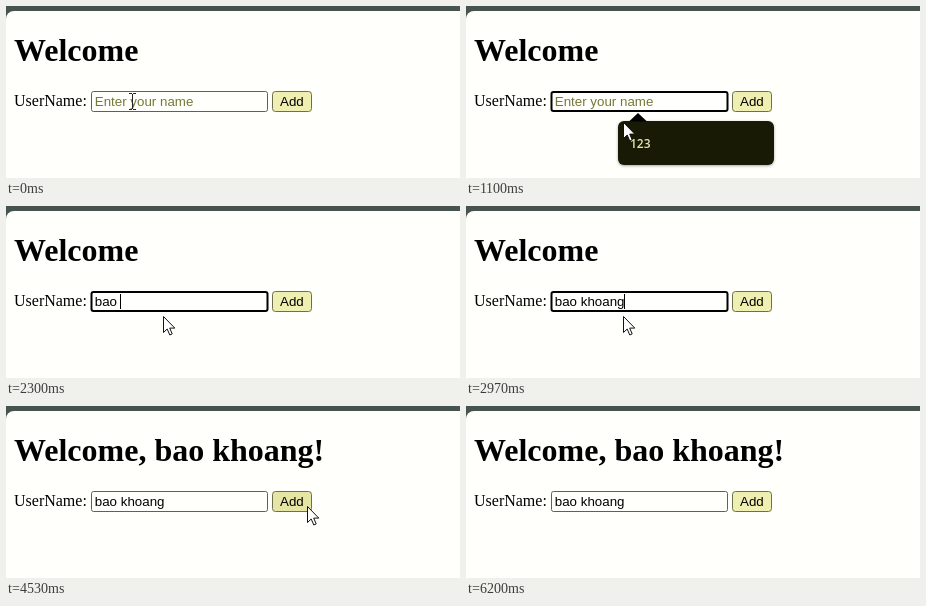
These frames come from a looping animation (454x172 px, 6.31 s). An HTML page with a canvas:

```html
<!DOCTYPE html>
<html lang="en">
<head>
<meta charset="utf-8">
<title>Welcome form</title>
<style>
html, body { margin: 0; width: 100%; height: 100%; overflow: hidden; background: #fffffb; }
canvas { display: block; width: 454px; height: 172px; }
</style>
</head>
<body>
<canvas id="stage"></canvas>
<script>
const W = 454, H = 172, LOOP = 6310;
const SERIF = '"Liberation Serif", "Times New Roman", serif';
const SANS = '"Liberation Sans", Arial, sans-serif';
const NAME = 'bao khoang';

const FOCUS = 110, POPUP = 170, BLUR = 4320, CURSOR_OUT = 5880;
const KEYS = [1480, 1700, 1960, 2160, 2400, 2510, 2620, 2730, 2840, 2950];
const TYPING_DONE = 3030;

// time, x, y of the pointer's hot spot
const PATH = [
  [0, 126, 95], [250, 126, 95], [580, 155, 138], [750, 155, 138],
  [1250, 157, 110], [3860, 157, 110], [4180, 284, 97], [4480, 284, 97],
  [4700, 411, 117], [5060, 298, 44], [5200, 298, 44], [5500, 297, 38]
];

const canvas = document.getElementById('stage');
const ctx = canvas.getContext('2d');
const dpr = window.devicePixelRatio || 1;
canvas.width = Math.round(W * dpr);
canvas.height = Math.round(H * dpr);

function text(str, x, y, font, color) {
  ctx.font = font;
  ctx.fillStyle = color;
  ctx.fillText(str, x, y);
}

function box(x, y, w, h, r, fill, stroke, line = 1) {
  ctx.beginPath();
  ctx.roundRect(x, y, w, h, r);
  if (fill) {
    ctx.fillStyle = fill;
    ctx.fill();
  }
  if (stroke) {
    ctx.strokeStyle = stroke;
    ctx.lineWidth = line;
    ctx.stroke();
  }
}

function pointerAt(t) {
  const i = PATH.findIndex(p => p[0] > t);
  if (i < 0) return PATH[PATH.length - 1].slice(1);
  const [t0, x0, y0] = PATH[i - 1], [t1, x1, y1] = PATH[i];
  const u = (t - t0) / (t1 - t0), e = u * u * (3 - 2 * u);
  return [x0 + (x1 - x0) * e, y0 + (y1 - y0) * e];
}

const inside = (x, y, l, t, r, b) => x >= l && x < r && y >= t && y < b;

function drawInput(t, typed) {
  const focused = t >= FOCUS && t < BLUR;
  if (focused) box(85.5, 86, 176, 19, 2, '#fffffb', '#000', 2);
  else box(85.5, 85.5, 176, 20, 2, '#fffffb', '#62624c');

  const font = '13.333px ' + SANS;
  if (typed) text(typed, 88.8, 100, font, '#000');
  else text('Enter your name', 88.8, 100, font, '#77773a');

  const lastKey = KEYS.filter(k => k <= t).pop() || FOCUS;
  const blinkOn = Math.floor((t - lastKey) / 500) % 2 === 0;
  if (focused && t < TYPING_DONE && blinkOn) {
    ctx.font = font;
    const x = Math.floor(88.8 + ctx.measureText(typed).width);
    ctx.fillStyle = '#000';
    ctx.fillRect(x, 88, 1, 15);
  }
}

function drawButton(hover) {
  box(266.5, 85.5, 39, 20, 3, hover ? '#e5e5a4' : '#f0efb2', '#6e6e50');
  text('Add', 274, 100, '13.333px ' + SANS, '#000');
}

function drawPopup() {
  ctx.save();
  ctx.shadowColor = 'rgba(0,0,0,.35)';
  ctx.shadowBlur = 3 * dpr;
  ctx.shadowOffsetY = dpr;
  box(152, 115, 156, 44, 6, '#191a05');
  ctx.restore();
  ctx.beginPath();
  ctx.moveTo(163, 115.5);
  ctx.lineTo(172, 107);
  ctx.lineTo(181, 115.5);
  ctx.fill();
  text('123', 164, 142, '600 12px "Open Sans", "Noto Sans", sans-serif', '#e6e6b4');
}

function drawArrow(x, y) {
  ctx.save();
  ctx.translate(Math.round(x) + .5, Math.round(y) + .5);
  ctx.beginPath();
  [[0, 0], [0, 16], [3.7, 12.5], [6.3, 18.5], [8.7, 17.4], [6.2, 11.6], [11.3, 11.6]]
    .forEach(p => ctx.lineTo(...p));
  ctx.closePath();
  ctx.fillStyle = '#fff';
  ctx.fill();
  ctx.strokeStyle = '#111';
  ctx.lineWidth = 1;
  ctx.stroke();
  ctx.restore();
}

function drawBeam(x, y) {
  x = Math.round(x);
  y = Math.round(y);
  ctx.fillStyle = '#222';
  ctx.fillRect(x, y - 7, 1, 15);
  for (const edge of [y - 8, y + 8]) {
    ctx.fillRect(x - 3, edge, 3, 1);
    ctx.fillRect(x + 1, edge, 3, 1);
  }
}

function draw(t) {
  const typed = NAME.slice(0, KEYS.filter(k => k <= t).length);
  const greeted = t >= BLUR;
  const [x, y] = pointerAt(t);
  const hover = inside(x, y, 266, 85, 306, 106);

  ctx.setTransform(dpr, 0, 0, dpr, 0, 0);
  ctx.fillStyle = '#46534e';
  ctx.fillRect(0, 0, W, H);
  box(0, 5, W, H, [8, 0, 0, 0], '#fffffb');

  text(greeted ? `Welcome, ${NAME}!` : 'Welcome', 8, 55, 'bold 32px ' + SERIF, '#000');
  text('UserName:', 8, 100, '16px ' + SERIF, '#000');
  drawInput(t, typed);
  drawButton(hover);
  if (t >= POPUP && t < KEYS[1]) drawPopup();

  if (t < CURSOR_OUT) {
    const overText = inside(x, y, 85, 85, 262, 106) || inside(x, y, 8, 27, 318, 63);
    (overText ? drawBeam : drawArrow)(x, y);
  }
}

function tick() {
  draw(performance.now() % LOOP);
  requestAnimationFrame(tick);
}
tick();
</script>
</body>
</html>
```
